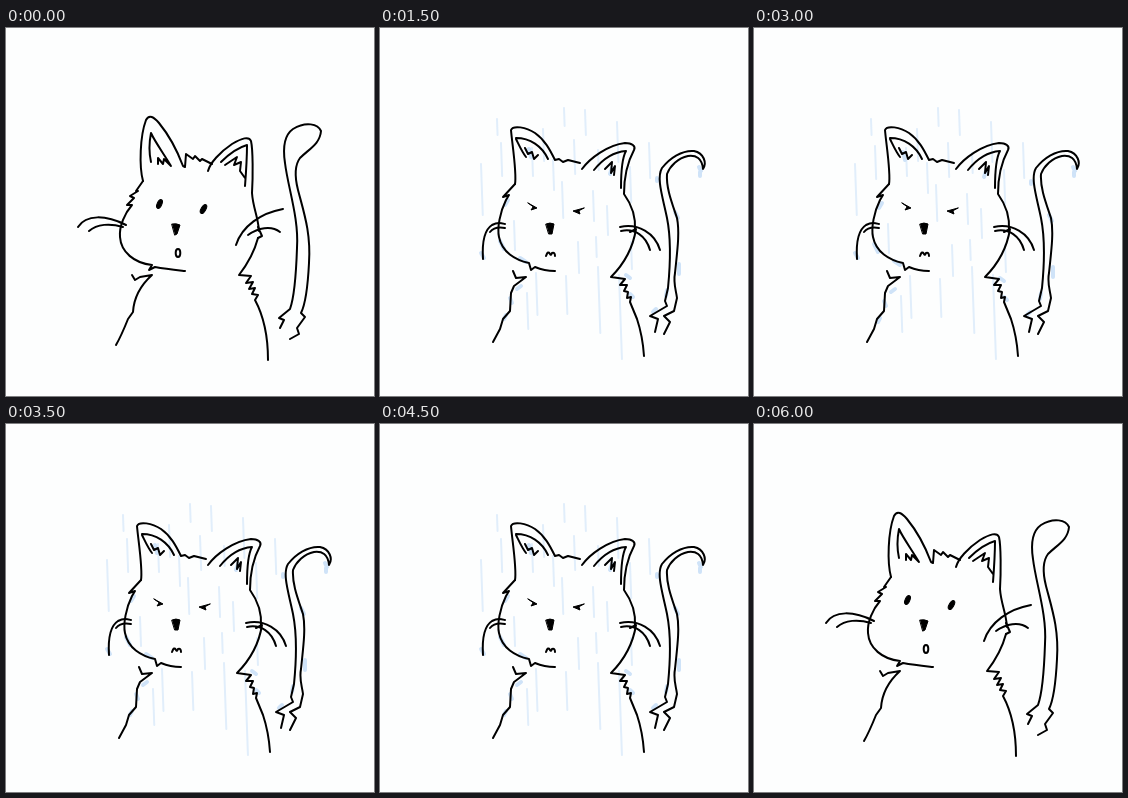
Recreate the animation shown at these times as an HTML page. Size 368 by 368 pixels, loop 6.5 s.

```html
<!DOCTYPE html>
<html lang="en">
<head>
<meta charset="utf-8">
<title>Cat in the rain</title>
<style>
  html, body { margin: 0; width: 100%; height: 100%; overflow: hidden; background: #fdfefe; }
  svg { display: block; width: 100vw; height: 100vh; }
  .ink { fill: none; stroke: #000; stroke-width: 2; stroke-linecap: round; stroke-linejoin: round; }
  .solid { fill: #000; stroke-width: 1; }
  .rain { fill: none; stroke: #e1eefb; stroke-width: 2; stroke-linecap: round; }
  .drops { fill: none; stroke: #cfe3f8; stroke-width: 4; stroke-linecap: round; stroke-linejoin: round; }
</style>
</head>
<body>
<svg viewBox="0 0 368 368">
  <g id="dry" class="ink">
    <!-- ears and crown -->
    <path d="M137 153C133 138 134 108 140 92C143 86 148 89 153 95C162 106 171 122 177 138L179 139L180 126L187 131L189 128L194 133L196 131L206 136"/>
    <path d="M145 134C143 125 143 115 145 105C149 114 158 126 165 138L158 131L157 136L152 130L152 136"/>
    <path d="M202 143C204 135 214 124 226 116C236 110 243 108 245 113C247 122 247 148 246 165C247 180 252 188 253 203"/>
    <path d="M215 134C224 125 234 119 241 117C241 130 240 145 239 158M219 137L231 129L228 137L235 134L234 143L239 150"/>
    <!-- cheeks and whiskers -->
    <path d="M137 153L130 163L132 163L124 168L128 170L121 177L126 177C119 185 113 198 114 209C115 224 128 235 146 237L143 242L149 239C160 241 170 242 179 243"/>
    <path d="M72 199C80 186 100 187 120 197M83 203C91 196 104 195 117 199"/>
    <path d="M230 217C236 198 255 185 277 181M242 207C252 200 265 197 274 204M252 199L256 208L252 210"/>
    <!-- face -->
    <g class="solid">
      <ellipse cx="153.5" cy="176" rx="2.3" ry="4.7" transform="rotate(25 153.5 176)"/>
      <ellipse cx="197.5" cy="181" rx="2.3" ry="5" transform="rotate(30 197.5 181)"/>
      <path d="M166 196Q170 195 174 197L171 206L169 207Z"/>
    </g>
    <ellipse cx="172" cy="225" rx="2.3" ry="4"/>
    <!-- body -->
    <path d="M126 247L129 252L134 249L146 247C136 256 128 268 127 284L122 291C118 301 114 310 110 317"/>
    <path d="M252 210C248 225 240 238 233 247L245 248L240 255L247 254L243 261L249 260L246 266L252 267L249 272C256 285 262 305 262 332"/>
    <!-- tail -->
    <path d="M274 300L278 292L273 290L284 281C288 270 290 250 291 220C293 190 282 160 279 135C277 122 277 108 287 101C300 93 312 96 315 103C314 116 303 121 294 130C288 138 289 150 292 162C298 185 305 205 303 235C302 255 300 275 295 285L299 289L291 300L293 306L284 311"/>
  </g>

  <g id="wet">
    <path id="rain" class="rain"/>
    <path id="shower" class="rain"/>
    <path class="drops" d="M320 144L320 148M319 139L321 143M101 225L104 230"/>
    <path id="drips" class="drops" d="M149 121L151 129M232 140L230 146M128 172L125 177M120 213L124 221M140 230L146 234M130 270L132 275M126 287L124 291M246 247L250 250M250 266L253 269M277 150L277 153M295 184L298 190M299 236L299 246M287 262L286 268M273 284L276 281M141 258L137 261"/>
    <g class="ink">
      <!-- ears and crown -->
      <path d="M135 156C137 145 132 115 131 102C133 97 146 99 155 105C165 112 170 122 175 132L179 131L183 134L188 132L200 135"/>
      <path d="M136 110C150 110 162 118 168 131M136 111C139 117 142 124 146 129M145 120L148 126L152 124L154 131L158 127"/>
      <path d="M202 141C210 130 228 117 245 115C252 115 256 118 254 122C247 135 244 148 244 166C252 177 256 190 255 203"/>
      <path d="M214 142C222 132 232 124 246 123C242 130 241 148 241 160M225 141L232 134L231 145L235 138L234 147"/>
      <!-- cheeks and whiskers -->
      <path d="M135 156L123 169L129 167L126 172C120 184 117 200 119 209C122 224 135 232 149 235L151 242L155 239C162 242 168 243 175 243"/>
      <path d="M103 231C102 215 104 202 112 197C118 194 121 195 125 196M110 204C114 199 120 199 125 200"/>
      <path d="M240 199C258 195 275 205 280 222M241 203C255 200 266 208 270 222"/>
      <!-- face -->
      <g class="solid">
        <path d="M148 175L157 180L151 182L153 179Z"/>
        <path d="M204 180L193 183L200 186L199 183Z"/>
        <path d="M166 196Q170 194 174 196L172 206L169 206Z"/>
      </g>
      <path d="M166 228Q168 222 170 226Q171 228 172 225Q175 224 175 228"/>
      <!-- body -->
      <path d="M133 243L136 250L146 249L134 258L131 265L130 283L123 291L120 301L113 314"/>
      <path d="M250 204L256 201C253 220 245 235 231 249L245 251L240 257L247 257L244 263L248 264L247 270L251 269L250 274L257 291C260 300 263 313 264 328"/>
      <!-- tail -->
      <path d="M275 304L278 291L270 288L287 278L285 273L288 260C290 240 291 210 287 190C283 170 276 150 282 140C290 130 302 122 314 123C324 125 327 135 323 141C322 130 316 127 308 128C298 130 290 138 287 146C286 160 292 175 297 190C300 205 297 225 295 245C293 255 296 262 297 270L294 283L284 288L290 294L284 306"/>
    </g>
  </g>
</svg>
<script>
  const LOOP = 6500, STEP = 500;
  const $ = id => document.getElementById(id);
  const streaks = rows => rows.map(([x, top, end]) =>
    `M${x} ${top}L${x + (end - top) * 0.035} ${end}`).join('');

  // Each streak: x, top, bottom
  $('rain').setAttribute('d', streaks([
    [117, 91, 107], [184, 80, 98], [205, 82, 107], [101, 136, 187],
    [237, 94, 134], [163, 101, 133], [269, 115, 150], [218, 239, 305],
    [239, 247, 331], [152, 120, 148]
  ]));
  $('shower').setAttribute('d', streaks([
    [173, 132, 162], [194, 112, 146], [218, 122, 142], [182, 154, 190],
    [213, 163, 193], [227, 178, 207], [134, 193, 222], [156, 245, 287],
    [147, 265, 301], [186, 248, 286], [198, 214, 245], [251, 214, 241],
    [216, 209, 229], [121, 115, 148], [250, 139, 174]
  ]));

  function draw(now) {
    const step = Math.floor(now % LOOP / STEP);
    const dry = step === 0 || step === 12;
    const slide = step % 2 ? 0 : 3;
    $('dry').style.display = dry ? '' : 'none';
    $('wet').style.display = dry ? 'none' : '';
    for (const id of ['shower', 'drips'])
      $(id).setAttribute('transform', `translate(0 ${slide})`);
  }

  const start = performance.now();
  function tick() {
    draw(performance.now() - start);
    requestAnimationFrame(tick);
  }
  tick();
</script>
</body>
</html>
```
